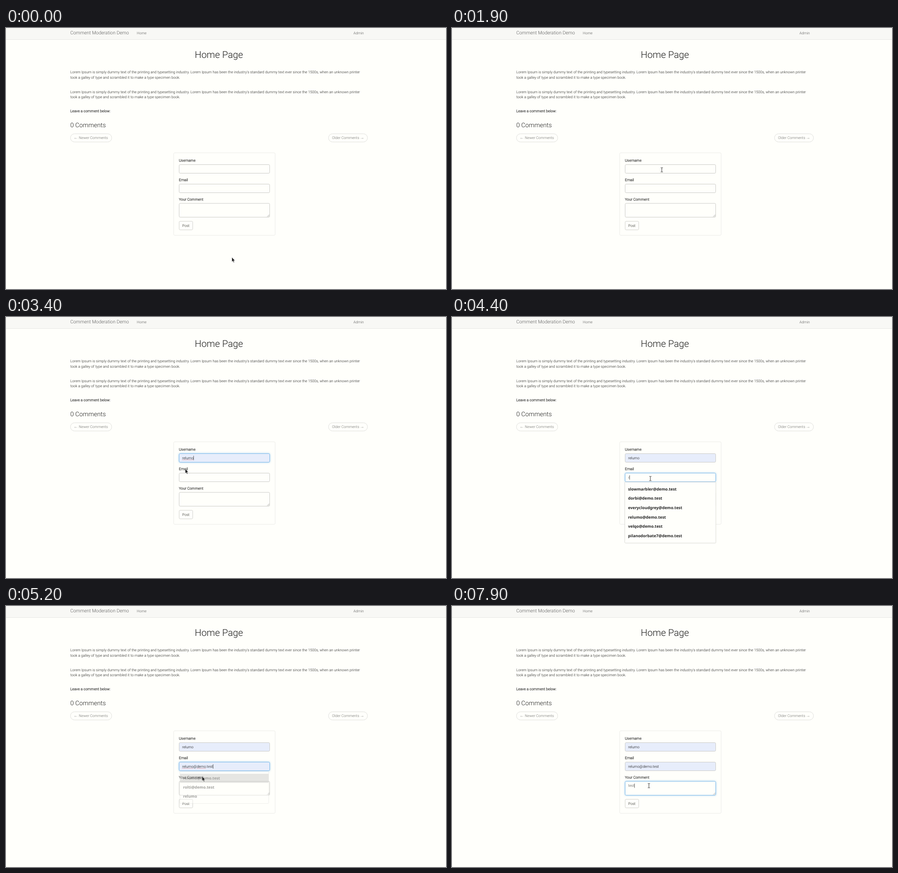
Recreate the animation shown at these times as an HTML page. Size 972 by 576 pixels, loop 8 s.

```html
<!DOCTYPE html>
<html lang="en">
<head>
<meta charset="utf-8">
<title>Comment Moderation Demo</title>
<style>
  html, body { margin: 0; width: 100%; height: 100%; overflow: hidden; background: #fffffb; }
  svg { display: block; }
  text { font-family: Roboto, sans-serif; font-weight: 300; text-rendering: geometricPrecision; white-space: pre; }
  .bold { stroke: #333; stroke-width: .25px; letter-spacing: .04px; }
  .option { font-family: "Noto Sans", sans-serif; font-weight: 600; }
  .arrow { font-family: "DejaVu Sans", sans-serif; }
  .focus { filter: drop-shadow(0 0 2px rgba(102, 175, 233, .6)); }
  .menu { filter: drop-shadow(0 .8px .7px rgba(0, 0, 0, .35)); }
</style>
</head>
<body>
<svg id="stage" width="972" height="576" viewBox="0 0 972 576"></svg>
<script>
const LOOP = 8000, STEP = 100, BODY = 8.07, PITCH = 20.7, PAD = 5.2;
const stage = document.getElementById('stage');
const pen = document.createElement('canvas').getContext('2d');
pen.font = `300 ${BODY * 10}px Roboto, sans-serif`;
const widthOf = s => pen.measureText(s).width / 10;

const USER = 'relumo', MAIL = 'relumo@demo.test';
const USERS = ['tumexo', 'velqui', USER, 'dorbat', 'rolti', 'pilano'];
const MAILS = ['slowmarbler@demo.test', 'dorbi@demo.test', 'everycloudgrey@demo.test',
  MAIL, 'velqo@demo.test', 'pilanodorbate7@demo.test'];
const MAILS_R = [MAIL, 'rolti@demo.test', USER];

const text = (x, y, s, size = BODY, fill = '#1c1c1c', cls = '') =>
  `<text x="${x}" y="${y}" font-size="${size}" fill="${fill}" class="${cls}">${s}</text>`;
const rect = (x, y, w, h, stroke, fill = 'none', r = 2.3, cls = '', weight = 1) =>
  `<rect x="${x}" y="${y}" width="${w}" height="${h}" rx="${r}" stroke="${stroke}" stroke-width="${weight}" fill="${fill}" class="${cls}"/>`;
const line = (d, stroke, w = .8, extra = '') =>
  `<path d="${d}" fill="none" stroke="${stroke}" stroke-width="${w}" ${extra}/>`;

// Latest value whose start time has been reached.
const at = (t, track) => track.filter(k => k[0] <= t).pop()[1];

function page() {
  const first = 'Lorem Ipsum is simply dummy text of the printing and typesetting industry. ' +
    "Lorem Ipsum has been the industry's standard dummy text ever since the 1500s, when an unknown printer";
  const second = 'took a galley of type and scrambled it to make a type specimen book.';
  const paragraph = y => text(142, y, first) + text(142, y + 11.5, second);
  const label = (y, s) => text(382, y, s, BODY, '#333', 'bold');
  return '<path d="M0 0H972V25H0z" fill="#f8f8f5"/>' + line('M0 25.5H972', '#e7e7e4', 1) +
    text(142, 14.4, 'Comment Moderation Demo', 10.38, '#555') +
    text(289, 13.8, 'Home', BODY, '#555') + text(767.5, 13.8, 'Admin', BODY, '#555') +
    text(417, 66.4, 'Home Page', 20.75) +
    paragraph(100.4) + paragraph(143.6) +
    text(142, 186.3, 'Leave a comment below:', BODY, '#333', 'bold') +
    text(142, 218.6, '0 Comments', 13.83) +
    rect(142.5, 233.5, 91, 18, '#e0e0dd', 'none', 8.8) +
    text(151, 245.8, '←', BODY, '#999', 'arrow') + text(161, 245.4, 'Newer Comments', BODY, '#666') +
    rect(712.5, 233.5, 86, 18, '#e0e0dd', 'none', 8.8) +
    text(720.3, 245.4, 'Older Comments', BODY, '#666') + text(783, 245.8, '→', BODY, '#999', 'arrow') +
    rect(370.5, 275.5, 224, 182, '#ebebe8') +
    label(295.3, 'Username') + label(337.9, 'Email') + label(380.5, 'Your Comment') +
    rect(382.5, 426.5, 30, 19, '#d2d2cf') + text(389.3, 438.8, 'Post');
}

function field(y, h, value, { focus, filled, caret = focus, spell }) {
  const base = y + 12.3, x = 389.3, end = x + widthOf(value) + .4;
  let out = rect(382.5, y, 200, h, focus ? '#7cb9ea' : '#cbcbc8', filled ? '#e7edfb' : '#fffffb', 2.3, focus ? 'focus' : '') +
    text(x, base, value, BODY, filled ? '#000' : '#444');
  if (spell) {
    const [name, host] = value.split('@');
    const wave = (from, s) => line(`M${from} ${base + 1.5}h${widthOf(s)}`, '#d66', .7, 'stroke-dasharray="1.4 .6"');
    out += wave(x, name);
    if (host) out += wave(x + widthOf(name + '@'), host.split('.')[0]);
  }
  if (caret) out += line(`M${end} ${y + 4.8}v9.6`, '#333');
  return out;
}

function menu(y, items, hover, alpha) {
  const h = 2 * PAD + items.length * PITCH, cx = 482, cy = y + h / 2, scale = .956 + .044 * alpha;
  return `<g opacity="${alpha}" transform="translate(${cx} ${cy}) scale(${scale}) translate(${-cx} ${-cy})">` +
    rect(381.8, y, 201, h, '#dededb', '#fffffb', 1.5, 'menu', .5) +
    (hover ? `<path d="M382 ${y + PAD}h200.5v${PITCH}H382z" fill="#c6c6c4"/>` : '') +
    items.map((s, i) => text(389, y + PAD + PITCH * (i + .5) + 2.9, s, 8.75, '#222', 'option')).join('') + '</g>';
}

// Pointer stops: time, x, y
const PATH = [[0, 499, 506], [800, 499, 506], [1000, 476.5, 506], [1100, 476.5, 506], [1900, 463.5, 313],
  [2900, 463.5, 313], [3000, 396, 335], [3500, 396, 335], [3600, 445, 354], [3700, 438.2, 356.5],
  [4800, 438.2, 356.5], [4900, 433.3, 376], [5400, 433.3, 376], [5500, 435, 396.5], [LOOP, 435, 396.5]];

function pointer(t) {
  const i = PATH.findIndex(k => k[0] > t), [t0, x0, y0] = PATH[i - 1], [t1, x1, y1] = PATH[i];
  const u = (t - t0) / (t1 - t0), e = u * u * (3 - 2 * u);
  const x = x0 + (x1 - x0) * e, y = y0 + (y1 - y0) * e;
  const overMenu = (t >= 2700 && t < 3600) || (t >= 4700 && t < 5500);
  const overField = [[301, 321], [344, 364], [387, 418]].some(([a, b]) => y > a && y < b);
  const shape = overField && !overMenu
    ? line('M-2.4 -4.7H-.6L0 -4.2L.6 -4.7H2.4M0 -4.2V4.2M-2.4 4.7H-.6L0 4.2L.6 4.7H2.4', '#333', 1)
    : '<path d="M0 0v10l2.2-2 1.6 3.6 1.6-.7-1.6-3.5h3z" fill="#1c1c1c" stroke="#fff" stroke-width=".5"/>';
  return `<g transform="translate(${x} ${y})">${shape}</g>`;
}

function draw(t) {
  const focus = at(t, [[0, ''], [2200, 'user'], [3900, 'mail'], [5700, 'note']]);
  const user = at(t, [[0, ''], [2700, 'r'], [3000, USER]]);
  const mail = at(t, [[0, ''], [4400, 'r'], [4900, MAIL]]);
  const note = at(t, [[0, ''], [6000, 't'], [6200, 'ts'], [7500, 't'], [7600, 'te'], [7700, 'tes'], [7900, 'test']]);
  const alpha = at(t, [[0, 0], [2200, .5], [2300, 1], [3300, .43], [3400, 0],
    [3900, .5], [4000, 1], [5100, .8], [5200, .43], [5300, 0]]);
  let out = page() +
    field(301.5, 19, user, { focus: focus === 'user', filled: t >= 3000, spell: t >= 3300 && t < 3900 }) +
    field(344.5, 19, mail, { focus: focus === 'mail', filled: t >= 4900, spell: t >= 5100 && t < 5700 }) +
    field(387, 30.5, note, { focus: focus === 'note', caret: focus === 'note' && (t < 6800 || t >= 7400) }) +
    line('M577 416.5l4.5-4.5M579.5 416.5l2-2', '#888', .7);
  if (alpha) {
    out += t < 3900
      ? menu(321.7, t < 2800 ? USERS : [USER, 'rolti'], t >= 3000, alpha)
      : menu(364.2, t < 4500 ? MAILS : MAILS_R, t >= 4900, alpha);
  }
  stage.innerHTML = out + pointer(t);
}

let shown = -1;
function tick() {
  const t = Math.floor(performance.now() % LOOP / STEP) * STEP;
  if (t !== shown) draw(shown = t);
  requestAnimationFrame(tick);
}
tick();
</script>
</body>
</html>
```
